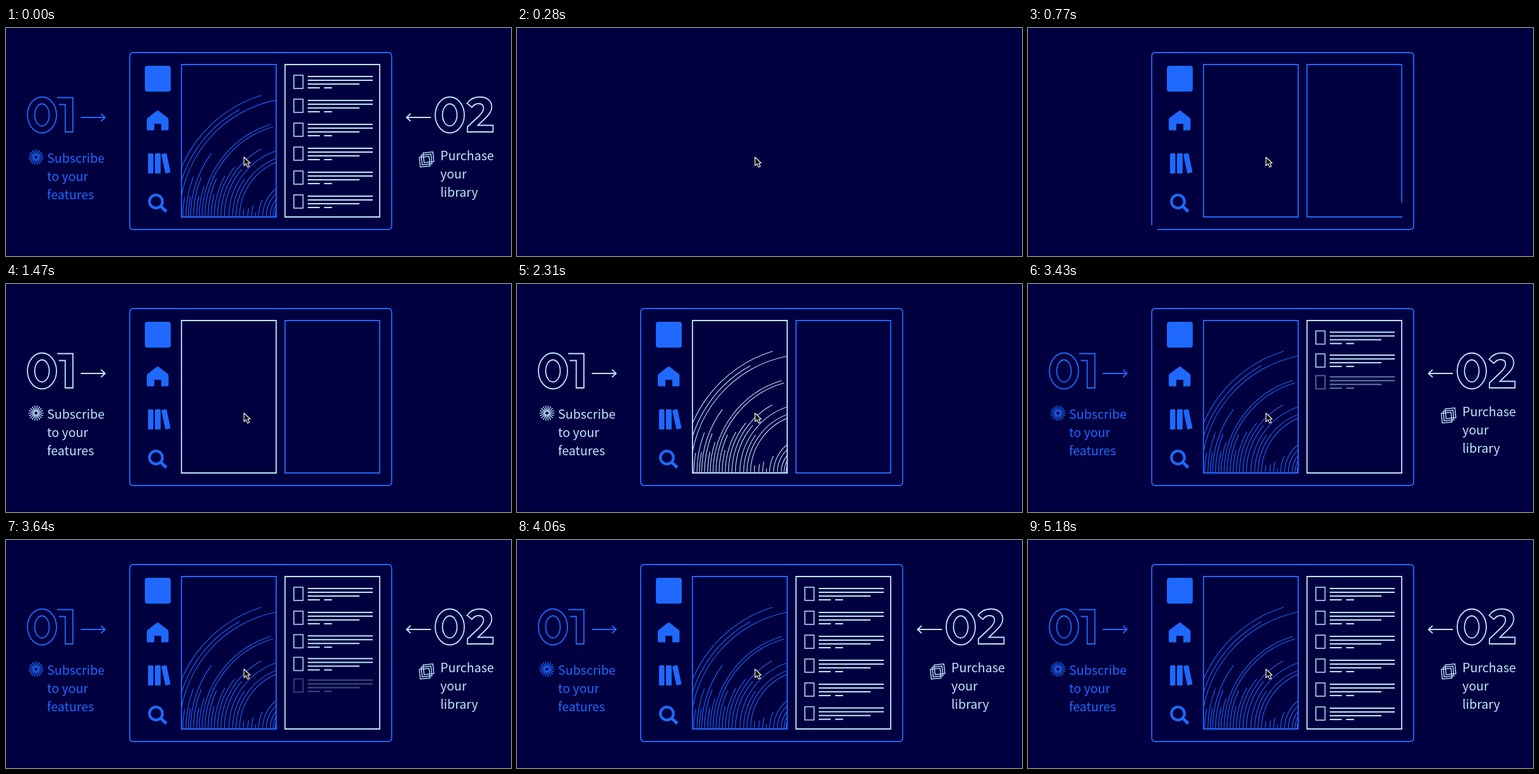
An HTML page for the animation above (5.39 s loop, 800 by 362 pixels).

```html
<!DOCTYPE html>
<html lang="en">
<head>
<meta charset="utf-8">
<title>Two steps: subscribe, then purchase</title>
<style>
  :root { --blue: #1f69ff; --light: #bfe6ff; --loop: 5390ms; --ease: cubic-bezier(.65, 0, .35, 1); }
  html, body { margin: 0; width: 100%; height: 100%; overflow: hidden; background: #000040; }
  svg { display: block; width: 100vw; height: 100vh; }
  text { font: 19.7px "Noto Sans CJK JP", "Noto Sans CJK SC", "Noto Sans", sans-serif; fill: currentColor; }

  .line { fill: none; stroke: currentColor; stroke-width: 1.8; }
  .thin { stroke-width: 1.1; }
  .solid { fill: currentColor; }
  .draw, .trace, .sweep { stroke-dasharray: 1 2; }

  /* --t moves a whole step, --d staggers the parts inside it */
  .frame, .one, .two, .trace, .icon, .in, .draw, .sweep, .row, .glow, .panel2 {
    animation: var(--loop) linear calc(var(--t, 0ms) + var(--d, 0ms)) infinite backwards;
  }
  .frame  { animation-name: frame; color: var(--blue); }
  .one    { animation-name: one; }
  .two    { animation-name: two; color: var(--light); }
  .two .in, .two .draw { --t: 2000ms; }
  .trace  { animation-name: trace; }
  .icon   { animation-name: icon; }
  .in     { animation-name: appear; }
  .draw   { animation-name: draw; }
  .sweep  { animation-name: sweep; }
  .row    { animation-name: row-fade, row-drop; }
  .glow   { animation-name: glow; }
  .panel2 { animation-name: panel2; }

  /* each step clears together, then waits for its turn */
  @keyframes frame { 0%, .6% { opacity: 1 } 4.2%, 6.4% { opacity: 0 } 6.41%, 100% { opacity: 1 } }
  @keyframes one   { 0%, .6% { opacity: 1 } 4.2%, 16% { opacity: 0 } 16.01%, 100% { opacity: 1 } }
  @keyframes two   { 0%, .6% { opacity: 1 } 4.2%, 53% { opacity: 0 } 53.01%, 100% { opacity: 1 } }

  @keyframes trace {
    0%, 4.5% { stroke-dashoffset: 0 }
    4.6%, 6.5% { stroke-dashoffset: 1.01; animation-timing-function: var(--ease) }
    14.6%, 100% { stroke-dashoffset: 0 }
  }
  @keyframes draw {
    0%, 4.5% { stroke-dashoffset: 0 }
    4.6%, 16.7% { stroke-dashoffset: 1.01; animation-timing-function: ease-in-out }
    21.15%, 100% { stroke-dashoffset: 0 }
  }
  @keyframes sweep {
    0%, 4.5% { stroke-dashoffset: 0 }
    4.6%, 27.6% { stroke-dashoffset: 1.01; animation-timing-function: var(--ease) }
    36%, 100% { stroke-dashoffset: 0 }
  }
  @keyframes icon   { 0%, 4.5% { opacity: 1 } 4.6%, 6.5% { opacity: 0 } 10%, 100% { opacity: 1 } }
  @keyframes appear { 0%, 4.5% { opacity: 1 } 4.6%, 16.7% { opacity: 0 } 21.15%, 100% { opacity: 1 } }

  @keyframes row-fade { 0%, 5% { opacity: 1 } 5.1%, 57.6% { opacity: 0 } 60.6%, 100% { opacity: 1 } }
  @keyframes row-drop {
    0%, 5% { transform: none }
    5.1%, 57.6% { transform: translateY(-7.5px); animation-timing-function: var(--ease) }
    66.5%, 100% { transform: none }
  }

  @keyframes glow {
    0%, 16.7% { color: var(--blue) }
    19%, 53.8% { color: var(--light) }
    56.3%, 100% { color: var(--blue) }
  }
  @keyframes panel2 {
    0%, 4.2% { color: var(--light) }
    4.3%, 53.8% { color: var(--blue) }
    56.3%, 100% { color: var(--light) }
  }
</style>
</head>
<body>
<svg viewBox="0 0 800 362">
  <defs>
    <clipPath id="inside"><rect x="278" y="58" width="150" height="242"/></clipPath>
    <g id="zero">
      <ellipse cx="23" cy="28.5" rx="23" ry="28.5"/>
      <ellipse cx="23" cy="28.5" rx="11.5" ry="17.5"/>
    </g>
  </defs>

  <g class="frame">
    <path class="line trace" style="--d:40ms" pathLength="1"
      d="M196 313V45Q196 39 202 39H605Q611 39 611 45V314Q611 320 605 320H202Q196 320 196 314Z"/>
    <g class="glow"><path class="line trace" stroke-linecap="square" pathLength="1" d="M428 300H278V58H428Z"/></g>
    <g class="panel2"><path class="line trace" stroke-linecap="square" style="--d:80ms" pathLength="1" d="M592 300H442V58H592Z"/></g>

    <rect class="solid icon" x="220" y="60" width="41" height="41" rx="4"/>
    <path class="solid icon" style="--d:30ms"
      d="M239 131.500Q240.500 130.300 242 131.500L256.500 143Q257.500 144 257.500 145.500V160.500Q257.500 162.500 255.500 162.500H246V152H235V162.500H225Q223 162.500 223 160.500V145.500Q223 144 224 143Z"/>
    <g class="solid icon" style="--d:60ms">
      <rect x="225" y="199" width="8.500" height="32" rx="1.500"/>
      <rect x="236" y="199" width="9" height="32" rx="1.500"/>
      <rect x="249" y="199" width="8.500" height="31.500" rx="1.500" transform="rotate(-12 253.250 214.500)"/>
    </g>
    <g class="line icon" style="--d:90ms; stroke-width:4.200">
      <circle cx="237.500" cy="275.500" r="10.300"/>
      <path d="M245 283L254 291.500" stroke-width="5"/>
    </g>
  </g>

  <g class="one"><g class="glow">
    <g class="line in">
      <use href="#zero" x="34" y="109.500"/>
      <path d="M81 110.500H106V165H93.800V121.500H83.500"/>
    </g>
    <path class="line draw" style="--d:130ms" pathLength="1" d="M118.500 142H157"/>
    <path class="line in" style="--d:260ms" d="M150.500 136L157 142L150.500 148"/>
    <g id="burst" class="line in" style="--d:140ms; stroke-width:1.300"></g>
    <g class="in" style="--d:260ms">
      <text x="65" y="214">Subscribe</text>
      <text x="65" y="243">to your</text>
      <text x="65" y="272">features</text>
    </g>
    <g id="arcs" clip-path="url(#inside)"></g>
  </g></g>

  <g class="two">
    <g class="line in">
      <use href="#zero" x="680" y="109.500"/>
      <path d="M730.500 119.500C736 112 742 109.500 750 109.500C762 109.500 769.500 115.500 769.500 125C769.500 132 766 137 758 144.500L747.500 154.500H771.500V165H731V157L750 139C755 134 756.500 131 756.500 127C756.500 122.500 753.500 120 748.500 120C744 120 741 122 738 126Z"/>
    </g>
    <path class="line draw" style="--d:130ms" pathLength="1" d="M673 142H634.500"/>
    <path class="line in" style="--d:260ms" d="M641 136L634.500 142L641 148"/>
    <g class="line in" style="--d:140ms; stroke-width:1.400">
      <rect x="661.500" y="197.500" width="15.500" height="15.500" transform="rotate(-6 669 205)"/>
      <rect x="658.500" y="201" width="15.500" height="15.500" transform="rotate(-6 666 208.500)"/>
      <rect x="655.500" y="204.500" width="15.500" height="15.500" transform="rotate(-6 663 212)"/>
    </g>
    <g class="in" style="--d:260ms">
      <text x="688" y="210">Purchase</text>
      <text x="688" y="239">your</text>
      <text x="688" y="268">library</text>
    </g>
    <g id="rows"></g>
  </g>

  <path d="M377 205V218.500L380.200 215.600L382.800 221L385.500 219.800L383 214.500H386.800Z"
    fill="#101010" stroke="#f4f4e4" stroke-width="1.200" stroke-linejoin="round"/>
</svg>

<script>
  const fill = (id, count, part) => {
    document.getElementById(id).innerHTML = Array.from({ length: count }, (_, i) => part(i)).join('');
  };

  const RAYS = 18;
  fill('burst', RAYS, i =>
    `<path d="M2.5 0H12" transform="translate(47.5 205) rotate(${i * 360 / RAYS})"/>`);

  // Concentric arcs: radius and the angle swept from the panel's base line
  const CENTER = { x: 464, y: 300 };
  const ARCS = [
    [202, 73], [194.7, 61], [189, 80], [184, 10], [179, 21], [175, 11], [171.5, 36], [167, 22],
    [162, 12], [158, 18], [153.4, 73], [148.8, 74], [144, 25], [139, 15], [134, 29], [129, 38],
    [123.5, 61], [118, 40], [111, 72], [105, 35], [99.7, 70], [94, 69], [88, 8], [81, 10],
    [75, 14], [69, 6], [64, 25], [57.6, 53], [51.6, 48], [45.6, 40], [41, 30], [38, 20]
  ];
  fill('arcs', ARCS.length, i => {
    const [r, degrees] = ARCS[i];
    const angle = degrees * Math.PI / 180;
    const x = CENTER.x - r * Math.cos(angle);
    const y = CENTER.y - r * Math.sin(angle);
    const delay = i * 7 % 11 * 20;
    return `<path class="line thin sweep" style="--d:${delay}ms" pathLength="1"
      d="M${CENTER.x - r} ${CENTER.y}A${r} ${r} 0 0 1 ${x} ${y}"/>`;
  });

  fill('rows', 6, i => {
    const y = 75 + i * 38;
    return `<g class="line row" style="--d:${i * 120}ms">
      <rect x="456" y="${y}" width="14.5" height="21" stroke-width="1.5"/>
      <path d="M478 ${y + 2}H581M478 ${y + 8}H581M478 ${y + 14}H560M478 ${y + 20}H497M504 ${y + 20}H516.500"/>
    </g>`;
  });
</script>
</body>
</html>
```
